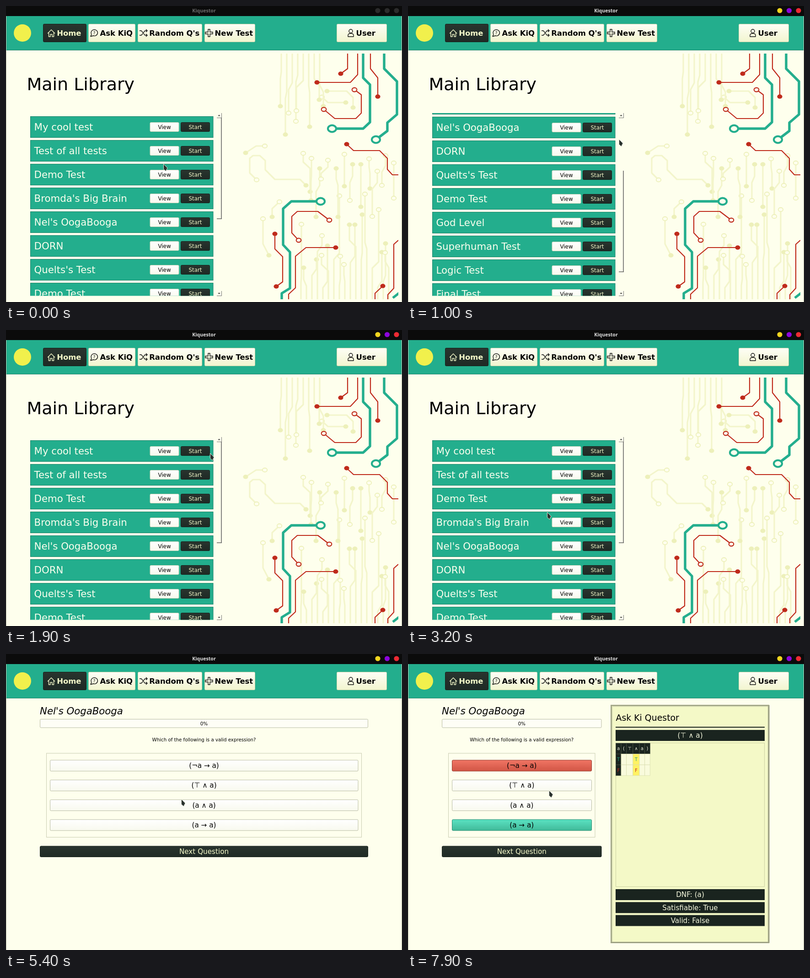
These frames come from a looping animation (866 px wide and 647 px high, 8 s). An HTML page:

```html
<!DOCTYPE html>
<html lang="en">
<head>
<meta charset="utf-8">
<title>Quiz library</title>
<style>
  html, body { margin: 0; width: 100%; height: 100%; overflow: hidden; background: #feffed; }
  svg { display: block; width: 100%; height: 100%; }
  text { font-family: "DejaVu Sans", sans-serif; white-space: pre; }
  .bar-title { font-family: "Noto Sans", sans-serif; font-weight: 600; }
</style>
</head>
<body>
<svg id="stage" viewBox="0 0 866 647">
  <defs>
    <clipPath id="listClip"><rect x="50" y="234" width="408" height="399.5"/></clipPath>
    <clipPath id="artClip"><rect x="515" y="104" width="343" height="537"/></clipPath>
    <g id="paints"></g>
  </defs>
  <rect width="866" height="647" fill="#feffed"/>
  <g id="chrome"></g>
  <g id="home"></g>
  <g id="quiz"></g>
  <g id="cursor" stroke-linejoin="round">
    <path id="arrow" d="M0 0V11L5 15.500L8.500 8.500Z" fill="#2a322e" stroke="#dfe3d4"/>
    <path id="hand" d="M0 1Q1-1 2 1L4 6Q8 5 8 9V13L6 16H3L2 12L-1 9Q0 7 2 9Z" fill="#26312c" stroke="#eef2dc"/>
  </g>
  <path d="M.5 22V647M865.500 22V647" stroke="#b9bda9"/>
</svg>
<script>
const $ = id => document.getElementById(id);
const GREEN = '#23ae8d', INK = '#1a241f', CREAM = '#f4f9c9', EDGE = '#b9bca4', PAPER = '#feffed';
const gradients = {
  light: ['#fefef6', '#f2f5cf'], white: ['#fff', '#f8f9ee'], dark: ['#29342e', '#1f2a25'],
  red: ['#f07564', '#d15545'], mint: ['#5ae2c2', '#41b999'],
};
$('paints').innerHTML = Object.entries(gradients).map(([id, [top, bottom]]) =>
  `<linearGradient id="${id}" x2="0" y2="1"><stop stop-color="${top}"/><stop offset="1" stop-color="${bottom}"/></linearGradient>`).join('');

const box = (x, y, w, h, fill, stroke = 'none', r = 0, sw = 1) =>
  `<rect x="${x}" y="${y}" width="${w}" height="${h}" rx="${r}" fill="${fill}" stroke="${stroke}" stroke-width="${sw}"/>`;
const text = (x, y, size, str, fill = '#000', extra = '') =>
  `<text x="${x}" y="${y}" font-size="${size}" fill="${fill}" ${extra}>${str}</text>`;
const mid = (x, y, size, str, fill, extra = '') => text(x, y, size, str, fill, 'text-anchor="middle" ' + extra);
const line = (d, stroke, w = 1, fill = 'none', extra = '') =>
  `<path d="${d}" stroke="${stroke}" stroke-width="${w}" fill="${fill}" stroke-linejoin="round" ${extra}/>`;
const disc = (x, y, r, fill, stroke = 'none', w = 0) =>
  `<circle cx="${x}" cy="${y}" r="${r}" fill="${fill}" stroke="${stroke}" stroke-width="${w}"/>`;

// Window bar and navigation
function chrome(active) {
  const lamps = active ? ['#f2d51f', '#8d05dc', '#ee2a33'] : Array(3).fill('#2c2c2c');
  const nav = (x, w, indent, label, dark) =>
    box(x + .5, 39.5, w, 39, `url(#${dark ? 'dark' : 'light'})`, dark ? '#16201b' : '#c5d3ab', 2) +
    text(x + indent, 65, 16.45, label, dark ? CREAM : '#000', 'font-weight="bold"');
  const icon = (d, color = '#111') => line(d, color, 1.4);
  return box(0, 0, 866, 22, '#0b0b0b') +
    mid(433, 13.5, 10.6, 'Kiquestor', active ? '#e2e2e2' : '#6c6c6c', 'class="bar-title"') +
    lamps.map((c, i) => disc(813 + i * 20.5, 10, 5.6, c)).join('') +
    box(0, 22, 866, 75, GREEN) + line('M0 96.500H866', '#1c8069') + disc(36, 59, 19, '#f1f04c') +
    nav(81, 94, 30.2, 'Home', true) + nav(180, 102, 25.5, 'Ask KiQ') + nav(288, 140, 25.2, "Random Q's") +
    nav(434, 110, 22.6, 'New Test') + nav(723, 109, 42.6, 'User') +
    icon('M91 60l8-8 8 8m-13.500-2v9h3.500v-5h4v5h3.500v-9', CREAM) +
    icon('M187 62A7.200 6.800 0 1 1 191 65l-6 1.500Z') + mid(193, 62, 9.5, '?', '#111') +
    icon('M292 54h4l8 10h5m-17 0h4l8-10h5m-3-3 3 3-3 3m0 4 3 3-3 3') +
    icon('M442 51h4v6h6v4h-6v6h-4v-6h-6v-4h6Z') +
    icon('M748 67v-3q0-4 6-4t6 4v3Z') + disc(754, 55, 4, 'none', '#111', 1.4);
}

// A trace is a path whose ends may carry a cap: "*" for a dot, "o" for a ring.
function traces(name, list, color, cap, width, ring, ringWidth) {
  const marker = (kind, shape) =>
    `<marker id="${name}${kind}" markerUnits="userSpaceOnUse" markerWidth="30" markerHeight="30" refX="0" refY="0" overflow="visible">${shape}</marker>`;
  const ends = { '*': 'dot', o: 'ring' };
  const end = (side, ch) => ends[ch] ? `marker-${side}="url(#${name}${ends[ch]})"` : '';
  return marker('dot', `<ellipse rx="5.600" ry="4.700" fill="${cap}"/>`) +
    marker('ring', `<ellipse rx="${ring}" ry="${ring * .82}" fill="${PAPER}" stroke="${cap}" stroke-width="${ringWidth}"/>`) +
    list.map(t => line(t.replace(/[*o]/g, ''), color, width, 'none', end('start', t[0]) + ' ' + end('end', t.at(-1)))).join('');
}

// Faint background traces: one bank hangs from the top, one rises from the bottom, with short strays between.
function faintTraces() {
  let seed = 11;
  const rnd = (lo, hi) => (seed = seed * 16807 % 2147483647, Math.round(lo + (hi - lo) * seed / 2147483647));
  const pick = () => '*o'[rnd(0, 1)];
  const list = ['oM566 306h-19l-23 15*', 'oM548 380l-15-15v-32l7-6h15l12 11v20l21 21h55l13 13*',
    'oM598 428l-16 15v18*', 'oM562 465v55l13 25*', 'oM691 199l13 12h39*', '*M702 186h43l14 14v22*'];
  for (let x = 602; x < 690; x += 12)
    list.push(`M${x} 104v${rnd(40, 90)}l${rnd(-18, 18)} 15v${rnd(30, 125)}${pick()}`);
  for (let x = 645; x < 845; x += 12)
    list.push(`M${x} 641v${rnd(-120, -25)}l${rnd(-16, 16)}-14v${rnd(-125, -15)}${pick()}`);
  for (let x = 650; x < 850; x += 18)
    list.push(`${pick()}M${x} ${rnd(315, 365)}v${rnd(15, 40)}l${rnd(-16, 16)} 14v${rnd(10, 70)}${pick()}`);
  return list;
}

function circuit() {
  const red = ['*M732 148l15-11v-33', '*M680 167h73l16-17v-46', '*M813 198v-41l-16-20v-33',
    'oM762 183l15 11v40l-12 12h-46l-24-20o', '*M745 302l15 14h57l17 17v24l11 12h13',
    'oM707 468l-25-19h-45l-12 11v36l15 16o', '*M588 498v33l17 17v55l-14 10*',
    '*M721 528h-65l-23 19v69l-15 14v11', 'M858 512l-10 9v96l-13 14v10', '*M824 612l-17 16v13'];
  const green = ['oM713 268h68l15-14v-82l-15-15v-53', 'oM809 292l25-19v-18l21-18v-72l-28-28v-33',
    'oM688 427h-64l-18 16v79l15 16v79l-18 11v13', 'M846 638l14-11'];
  return '<g clip-path="url(#artClip)">' +
    traces('faint', faintTraces(), '#f3f5cb', '#edf0ba', 3.2, 5.2, 1.8) +
    traces('red', red, '#bf2a1b', '#bf2a1b', 2.2, 5.3, 2.1) +
    traces('green', green, '#24ae8e', '#24ae8e', 5.4, 9, 4.2) + '</g>';
}

const tests = ['My cool test', 'Test of all tests', 'Demo Test', "Bromda's Big Brain", "Nel's OogaBooga", 'DORN',
  "Quelts's Test", 'Demo Test', 'God Level', 'Superhuman Test', 'Logic Test', 'Final Test', 'Demo Test'];
const ROW = 52, LIST_TOP = 241;

function home() {
  const button = (x, y, label, paint, color, edge) =>
    box(x - 31.5, y + 13.5, 63, 20, `url(#${paint})`, edge, 2) + mid(x, y + 27.5, 11.9, label, color);
  const rows = tests.map((name, i) => {
    const y = LIST_TOP + i * ROW;
    return box(53.5, y + .5, 399.5, 46, GREEN, '#1b8169') + text(61.6, y + 31.3, 21.25, name, '#fbffee') +
      button(346.5, y, 'View', 'white', '#000', '#c3d0b4') + button(414, y, 'Start', 'dark', CREAM, '#15241e');
  }).join('');
  return circuit() + text(45.4, 184, 38, 'Main Library') +
    `<g clip-path="url(#listClip)"><g id="rows">${rows}</g></g>` +
    line('M461 244.500h10.500v-10.500M461 633.500h10.500v-10.500', '#777') +
    line('M463.500 240.500l2.500-3 2.500 3ZM463.500 627l2.500 3 2.500-3Z', 'none', 0, '#444') +
    `<g id="handle">${line('M471 244v221M461 465h11', '#666', 1.6)}</g>`;
}

const strip = (y, str) => box(454, y, 326, 24, INK) + mid(617, y + 17.3, 15.2, str, '#f8fbe0');

function truthTable(formula) {
  const main = formula.search(/[∧→]/) + 1, h = 23.6;
  let x = 454.5, out = '';
  ['a', ...formula].forEach((token, col) => {
    const w = 'a()'.includes(token) ? 11.6 : 14.2;
    [token, 'T', 'F'].forEach((value, row) => {
      const y = 195 + row * h, dark = !row || !col, lit = col === main;
      out += box(x, y, w, h, dark ? INK : lit ? '#fff262' : '#f9fbdc', dark ? '#46503f' : '#d9deb0', 0, .8);
      if (dark || lit) out += mid(x + w / 2, y + 15.4, 9.8, value, ['#f5f8e2', '#1f9b7c', '#c4281c'][row]);
    });
    x += w;
  });
  return out;
}

const panel = formula =>
  box(444.5, 112.5, 344, 518, '#f4f9c7', '#a5a98a', 0, 3) + line('M447 629V115H787', '#d5dab2') +
  line('M443 631.500H790V112', '#8f9377') +
  text(454.5, 146, 18.9, 'Ask Ki Questor') + line('M454 160H780', INK, 2.2) +
  strip(166, formula) + box(454.5, 194.5, 325, 314, 'none', '#cbd0a2') + truthTable(formula.replaceAll(' ', '')) +
  ['DNF: (a)', 'Satisfiable: True', 'Valid: False'].map((str, i) => strip(514 + i * 28.3, str)).join('');

const options = ['(¬a → a)', '(⊤ ∧ a)', '(a ∧ a)', '(a → a)'];

function quiz(answered, formula, hover) {
  const right = formula ? 423.5 : 792, cx = (74 + right) / 2;
  const answers = options.map((label, i) => {
    const y = 232 + i * 43.3, wrong = answered && i === 0, correct = answered && i === 3;
    const fill = wrong && hover ? '#c75244' : `url(#${wrong ? 'red' : correct ? 'mint' : 'white'})`;
    return box(96.5, y, right - 118.5, 24, fill, wrong ? '#93372c' : correct ? '#278a70' : EDGE, 2) + mid(cx, y + 17, 15.2, label);
  }).join('');
  return text(74, 131.5, 21.25, "Nel's OogaBooga", '#000', 'font-style="italic"') +
    box(74.5, 142.5, right - 75, 18.5, '#fefef6', EDGE, 2) + mid(cx, 155.5, 10.5, '0%') +
    mid(cx, 190.5, 10.25, 'Which of the following is a valid expression?') +
    box(88.5, 217, right - 103, 183.5, 'none', '#c9ccb2') + answers +
    box(74.5, 420, right - 75, 23.5, 'url(#dark)', '#17211c', 2) + mid(cx, 437, 15.2, 'Next Question', CREAM) +
    (formula ? panel(formula) : '');
}

// Moves: [from ms, to ms, ...target]; the value rests between moves.
const pointerMoves = [
  [0, 400, 455, 282], [500, 800, 461, 291], [1200, 1400, 449, 388], [1400, 1900, 446, 269], [2000, 2200, 440, 270],
  [2300, 2800, 178, 380], [2800, 3600, 430, 415], [3600, 4400, 404, 467], [4800, 5500, 380, 292],
  [5700, 6200, 338, 241], [7000, 7300, 290, 318], [7300, 7500, 236, 281], [7800, 7900, 308, 298]];
const scrollMoves = [[500, 1000, 207], [1200, 1600, 0]];

const glide = (start, moves, t) => moves.reduce((value, [from, to, ...target]) => {
  const p = Math.min(1, Math.max(0, (t - from) / (to - from)));
  return value.map((v, i) => v + (target[i] - v) * p);
}, start).map(Math.round);

const shown = {};
function put(id, key, make) {
  if (shown[id] === key) return;
  shown[id] = key;
  $(id).innerHTML = make();
}
const show = (id, on) => { $(id).style.display = on ? '' : 'none'; };
const shift = (id, x, y) => $(id).setAttribute('transform', `translate(${x} ${y})`);

$('home').innerHTML = home();

function draw(now) {
  const t = Math.floor(now % 8000 / 100) * 100;
  const [x, y] = glide([344, 345], pointerMoves, t), [offset] = glide([0], scrollMoves, t);
  const active = t >= 600, onHome = t < 4900;
  put('chrome', active, () => chrome(active));
  show('home', onHome);
  show('quiz', !onHome);
  shift('rows', 0, -offset);
  shift('handle', 0, Math.round(offset * .558));
  if (!onHome) {
    const answered = t >= 6300, formula = t < 6600 ? '' : options[t < 7800 ? 0 : 1], hover = y > 231 && y < 257;
    put('quiz', [answered, formula, hover].join(), () => quiz(answered, formula, hover));
  }
  const rowY = (y + offset - LIST_TOP) % ROW;
  const hand = onHome && rowY > 13 && rowY < 34 && Math.min(Math.abs(x - 346), Math.abs(x - 414)) < 32;
  show('arrow', !hand);
  show('hand', hand);
  shift('cursor', x + .5, y + .5);
}

const start = performance.now();
(function tick() {
  draw(performance.now() - start);
  requestAnimationFrame(tick);
})();
</script>
</body>
</html>
```
